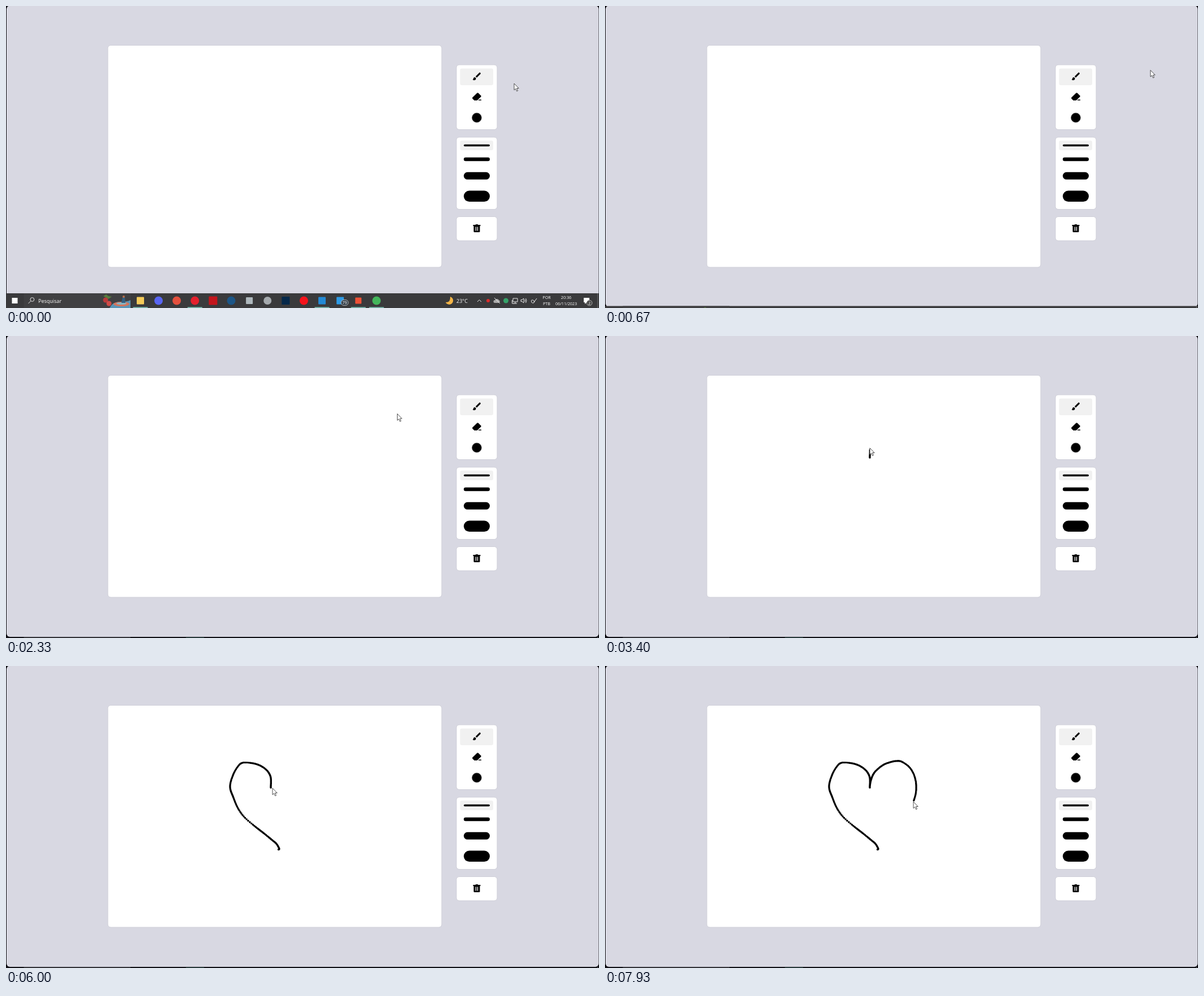
An HTML page that plays this animation: 1048x534 px, repeating every 8000 ms.

```html
<!DOCTYPE html>
<html lang="pt">
<head>
<meta charset="utf-8">
<title>Drawing board</title>
<style>
  html, body { margin: 0; width: 100%; height: 100%; overflow: hidden; background: #0b0b10; }
  svg { display: block; width: 1048px; height: 534px; }
  text { font-family: "Open Sans", "Noto Sans", sans-serif; fill: #fff; }
  .panel { fill: #fff; stroke: #cfcfd8; stroke-width: 1; }
  .active { fill: #f1f1f1; }
  .line { fill: none; stroke: #e8e8e8; stroke-width: 1; }
  .small { font-size: 7.2px; text-anchor: middle; }
</style>
</head>
<body>
<svg viewBox="0 0 1048 534">
  <rect width="1048" height="534" fill="#0b0b10"/>
  <rect x="1" y="-.5" width="1046.5" height="532.5" rx="6" fill="#d8d8e2"/>

  <rect class="panel" x="180" y="69.5" width="590" height="392.5" rx="5"/>
  <g id="tools">
    <rect class="panel" x="796" y="104" width="72" height="114.5" rx="5"/>
    <rect class="panel" x="796" y="232" width="72" height="127.5" rx="5"/>
    <rect class="panel" x="796" y="372.5" width="72" height="42.5" rx="5"/>
    <rect class="active" x="802.5" y="110.5" width="58.5" height="29.5" rx="3"/>
    <rect class="active" x="802.5" y="238" width="58.5" height="17" rx="3"/>
    <path transform="translate(823 115.3) scale(.76)" d="M7 14c-1.66 0-3 1.34-3 3 0 1.31-1.16 2-2 2 .92 1.22 2.49 2 4 2 2.21 0 4-1.79 4-4 0-1.66-1.34-3-3-3zm13.71-9.37l-1.34-1.34c-.39-.39-1.02-.39-1.41 0L9 12.25 11.75 15l8.96-8.96c.39-.39.39-1.02 0-1.41z"/>
    <path d="M824.4 161.8L832.6 153.8Q833.6 153 834.6 153.8L839.4 158.6Q840.2 159.6 839.4 160.6L832.6 167H827.6L824.4 163.8Q823.6 162.8 824.4 161.8ZM836 165.4H840V167H834.4Z"/>
    <circle cx="832" cy="197.5" r="8.5" stroke="#777" stroke-width=".7"/>
    <path d="M825.5 387H829.5L830.4 386H833.6L834.5 387H838.5V389H825.5ZM826.5 389H837.5V398.5Q837.5 400 836 400H828Q826.5 400 826.5 398.5Z"/>
    <path d="M830.5 390.5V397.5M833.5 390.5V397.5" stroke="#fff" stroke-width="1.3"/>
  </g>

  <path id="ink" fill="none" stroke="#000" stroke-width="3.6" stroke-linecap="round"/>

  <g id="taskbar">
    <rect id="bar" y="508" width="1048" height="28"/>
    <rect id="search" x="31.5" y="508" width="188.5" height="28"/>
    <rect x="10.5" y="516" width="10" height="10" fill="#fff"/>
    <circle class="line" cx="46.3" cy="519" r="3.4"/>
    <path class="line" d="M43.8 521.6L39.5 526"/>
    <text x="57" y="524.5" font-size="9">Pesquisar</text>
    <g id="doodle">
      <path d="M183 534Q188 523 202 523T220 520V534Z" fill="#5b94b5"/>
      <ellipse cx="204" cy="527" rx="14" ry="4" fill="#d5745b"/>
      <ellipse cx="204" cy="526" rx="9" ry="2" fill="#88b5c3"/>
      <path d="M204 525L206 515L210 515L211 525Z" fill="#315f82"/>
      <circle cx="208" cy="514" r="2" fill="#bb704b"/>
      <path d="M172 513L177 510L181 513L187 514L181 518Z" fill="#577d3d"/>
      <circle cx="176" cy="520" r="4.5" fill="#b93b3c"/>
      <circle cx="182" cy="526" r="4.5" fill="#cf4c48"/>
    </g>
    <g id="apps"></g>
    <rect x="592" y="519.5" width="13" height="10" rx="5" fill="#3c4650" stroke="#d8d8d8" stroke-width=".7"/>
    <text class="small" x="598.5" y="527.4">79</text>
    <path d="M785 514A7 7 0 1 1 777 524Q786 524 785 514Z" fill="#f4b548"/>
    <text x="796" y="524.5" font-size="9">23°C</text>
    <path class="line" d="M833 523L836.5 519.5L840 523"/>
    <circle cx="852" cy="521" r="3" fill="#d92b2b"/>
    <path d="M864 525A2.5 2.5 0 0 1 864 520A4 4 0 0 1 871 520A2.6 2.6 0 0 1 871 525Z" fill="#aaa"/>
    <path class="line" d="M863 516L873 526"/>
    <circle cx="883.5" cy="521" r="4.5" fill="#35a269"/>
    <path class="line" d="M896 517H904V523H896ZM894.5 520V526H898M900 523V526M897 526H903"/>
    <path class="line" d="M910 519.5H912L915 517V525L912 522.5H910ZM917 519Q918.5 521 917 523M918.5 517Q921.5 521 918.5 525"/>
    <path class="line" d="M929 524Q927 519 931 520T933 524L938 517M929 524Q932 527 934 523"/>
    <text class="small" x="955.5" y="518">POR</text>
    <text class="small" x="955.5" y="529">PTB</text>
    <text class="small" x="990" y="517.5">20:36</text>
    <text class="small" x="990" y="529">06/11/2023</text>
    <path d="M1021 516H1031V524H1026L1023 527V524H1021Z" fill="#fff"/>
    <circle cx="1031" cy="525" r="4.8" fill="#444" stroke="#ddd" stroke-width=".7"/>
    <text class="small" x="1031" y="527.6">2</text>
    <path d="M1045.5 508V534" stroke="#777" stroke-width=".7"/>
  </g>
  <rect id="glow" x="318" y="532.8" width="32" height="1.2" fill="#34504e"/>

  <path id="cursor" d="M0 0V11.6L2.6 9.2L4.6 13.6L6.5 12.8L4.6 8.5H8.2Z" fill="#fff" stroke="#222" stroke-width=".8" stroke-linejoin="round"/>
</svg>
<script>
const LOOP = 8000, FPS = 15, INK_LAG = 40, DOT_MS = 1000 / 60;
const $ = id => document.getElementById(id);
const NS = "http://www.w3.org/2000/svg";

function add(parent, tag, attrs) {
  const node = document.createElementNS(NS, tag);
  for (const key in attrs) node.setAttribute(key, attrs[key]);
  parent.append(node);
}

// brush widths: centre y, height
for (const [y, h] of [[246.5, 3.5], [271, 6.5], [300.3, 13], [336.3, 19.5]])
  add($("tools"), "rect", { x: 809, y: y - h / 2, width: 46, height: h, rx: h / 2 });

// taskbar icons: colour, round?, size, running?
[
  ["#f5cb59", 0, 13, 1], ["#5865f2", 1, 15], ["#e4503e", 1, 15], ["#e3202d", 1, 15, 1],
  ["#c3151c", 0, 15], ["#1d5687", 1, 15], ["#aeb8bd", 0, 12], ["#a4a9ad", 1, 14],
  ["#06284a", 0, 14], ["#f5131c", 1, 15], ["#2389d5", 0, 13, 1], ["#2f9be6", 0, 13],
  ["#ef5136", 0, 11, 1], ["#43b65b", 1, 15, 1]
].forEach(([fill, round, size, running], i) => {
  const cx = 237.5 + i * 32.1, half = size / 2;
  add($("apps"), "rect", { x: cx - half, y: 521 - half, width: size, height: size, rx: round ? half : 1, fill });
  if (running) add($("apps"), "rect", { x: cx - 13, y: 532.4, width: 26, height: 1.6, fill: "#79bdb0" });
});

// each leg of the pointer: [ms, x, y]
const arrive = [[0, 898, 137], [150, 913, 134], [320, 948, 120], [467, 965, 114], [600, 964, 113.5],
  [1400, 964, 113.5], [1700, 936, 103], [1900, 880, 100], [2100, 802, 108], [2270, 728, 125],
  [2400, 650, 153], [2550, 560, 185], [2700, 497, 206], [2870, 468, 213.5]];
const leftHalf = [[3090, 468, 214.5], [3200, 468, 214], [3400, 468, 198], [3500, 464.5, 189],
  [3600, 457, 181], [3700, 446, 174.7], [3800, 433, 171.5], [3880, 419, 171], [3950, 411.5, 175.5],
  [4070, 402, 191], [4250, 396, 213], [4450, 402, 233], [4600, 410.5, 252.5], [4700, 421.5, 267.5],
  [4800, 438, 282], [4930, 454, 294.5], [5070, 470, 307.5], [5170, 478, 314.5], [5280, 482.8, 323], [5350, 481.5, 324.5]];
const lift = [[5450, 481.5, 324], [5560, 482, 303], [5680, 479, 260], [5800, 473, 222],
  [6000, 471, 216], [6330, 468, 213]];
const rightHalf = [[6540, 468, 213], [6670, 470, 202], [6800, 475, 190], [6920, 484, 180.5],
  [7030, 494, 173.8], [7130, 505, 169.8], [7220, 515, 168], [7300, 524, 169], [7400, 537, 178],
  [7500, 545, 190], [7600, 549, 203], [7700, 550, 215], [7800, 549, 227], [7933, 545, 240]];
const slide = [[400, 0], [467, 5], [533, 13], [600, 19], [667, 22.5], [733, 23.6], [800, 24]];
const legs = [arrive, leftHalf, lift, rightHalf];

function slope(keys, i, axis) {
  const a = keys[i - 1], b = keys[i + 1];
  return a && b ? (b[axis] - a[axis]) / (b[0] - a[0]) : 0;
}

// cubic Hermite curve through timed keys
function sample(keys, t, axis) {
  const last = keys.length - 1;
  if (t <= keys[0][0]) return keys[0][axis];
  if (t >= keys[last][0]) return keys[last][axis];
  const i = keys.findIndex(key => key[0] > t) - 1;
  const [a, b] = [keys[i], keys[i + 1]];
  if (a[axis] === b[axis] && b[0] - a[0] > 300) return a[axis];
  const span = b[0] - a[0], u = (t - a[0]) / span, u2 = u * u, u3 = u2 * u;
  return (2 * u3 - 3 * u2 + 1) * a[axis] + (3 * u2 - 2 * u3) * b[axis]
    + span * ((u3 - 2 * u2 + u) * slope(keys, i, axis) + (u3 - u2) * slope(keys, i + 1, axis));
}

function inkDots(keys, until) {
  let d = "";
  const end = Math.min(until, keys.at(-1)[0]);
  for (let t = keys[0][0]; t <= end; t += DOT_MS)
    d += `M${sample(keys, t, 1).toFixed(1)} ${sample(keys, t, 2).toFixed(1)}h.01`;
  return d;
}

function draw(t) {
  const leg = legs.findLast(keys => t >= keys[0][0]);
  $("cursor").setAttribute("transform", `translate(${sample(leg, t, 1)} ${sample(leg, t, 2)})`);
  $("ink").setAttribute("d", inkDots(leftHalf, t - INK_LAG) + inkDots(rightHalf, t - INK_LAG));
  const drop = sample(slide, t, 1), hidden = drop > 23.9;
  $("taskbar").setAttribute("transform", `translate(0 ${drop})`);
  $("bar").setAttribute("fill", hidden ? "#101016" : "#3a3a3c");
  $("search").setAttribute("fill", hidden ? "#333338" : "#404042");
  $("glow").setAttribute("visibility", t > 2000 ? "visible" : "hidden");
}

const start = performance.now();
function tick() {
  const t = (performance.now() - start) % LOOP;
  draw(Math.floor(t * FPS / 1000 + .05) * 1000 / FPS);
  requestAnimationFrame(tick);
}
tick();
</script>
</body>
</html>
```
